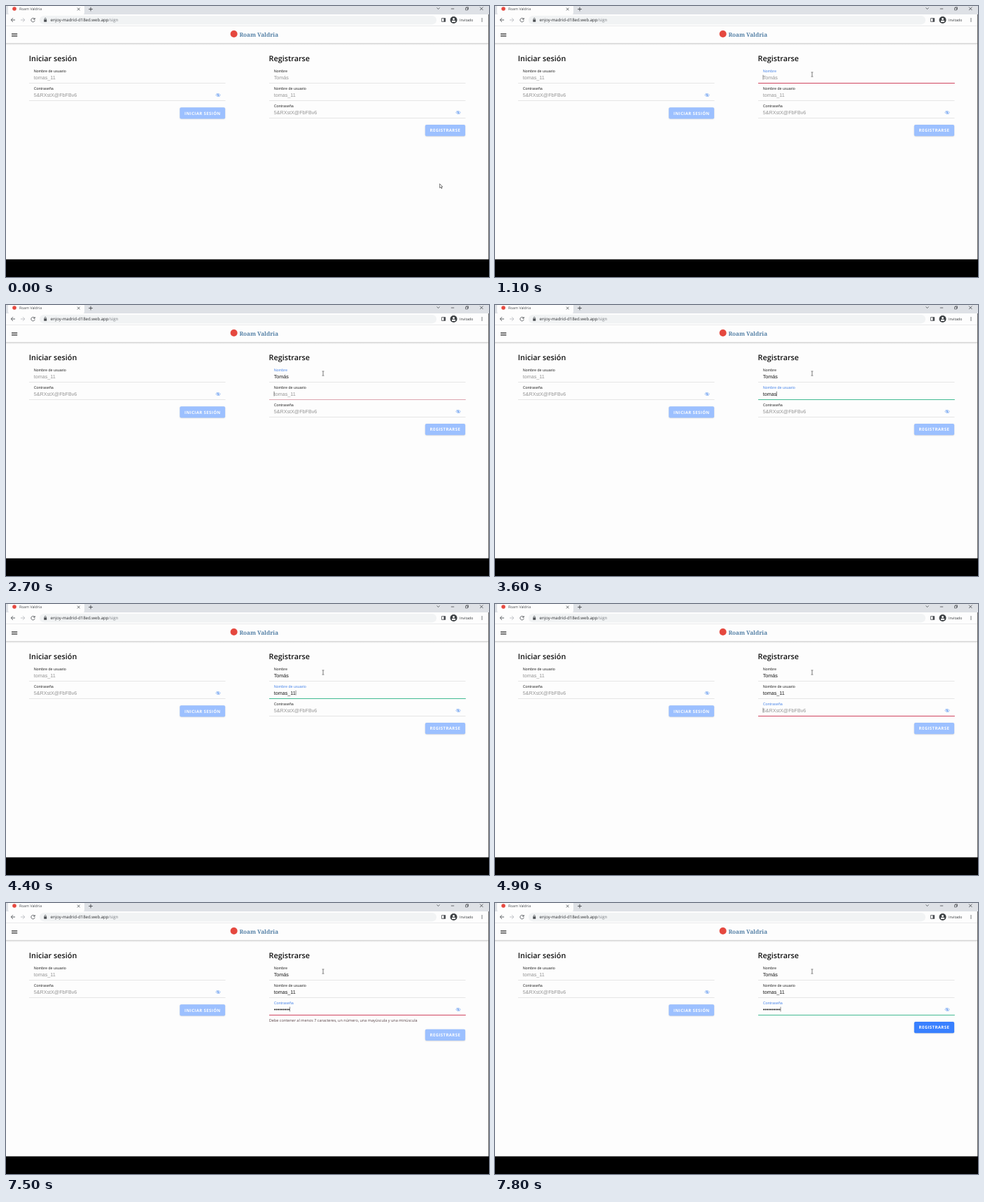
An HTML page with a canvas for the animation above (8000 ms loop, 690x388 px).

```html
<!DOCTYPE html>
<html lang="es">
<head>
<meta charset="utf-8">
<title>Roam Valdria</title>
<style>
html, body { margin: 0; width: 100%; height: 100%; overflow: hidden; background: #fdfdfd; }
canvas { display: block; width: 690px; height: 388px; }
</style>
</head>
<body>
<canvas id="stage"></canvas>
<script>
const W = 690, H = 388, LOOP = 8000, STEP = 100;
const UI = '"Open Sans", "Noto Sans", sans-serif';
const ARIAL = '"Liberation Sans", Arial, sans-serif';
const SLAB = '"Noto Serif", serif';
const RED = '#d0455f', GREEN = '#43bb92', LINE = '#e6e6e6';
const BRAND = 'Roam Valdria', PIN = '#e5483f';

const canvas = document.getElementById('stage');
const ctx = canvas.getContext('2d');
const dpr = window.devicePixelRatio || 1;
canvas.width = W * dpr;
canvas.height = H * dpr;
ctx.scale(dpr, dpr);
ctx.textRendering = 'geometricPrecision';

const clamp = v => Math.max(0, Math.min(1, v));
const smooth = v => v * v * (3 - 2 * v);
const mix = (a, b, p) => a + (b - a) * p;

function text(str, x, y, font, color, spacing = 0) {
  ctx.font = font;
  ctx.letterSpacing = spacing + 'px';
  ctx.fillStyle = color;
  ctx.fillText(str, x, y);
  return ctx.measureText(str).width;
}

function rect(x, y, w, h, color) {
  ctx.fillStyle = color;
  ctx.fillRect(x, y, w, h);
}

function round(x, y, w, h, r, color) {
  ctx.beginPath();
  ctx.roundRect(x, y, w, h, r);
  ctx.fillStyle = color;
  ctx.fill();
}

function dot(x, y, r, color) {
  ctx.beginPath();
  ctx.arc(x, y, r, 0, 7);
  ctx.fillStyle = color;
  ctx.fill();
}

function stroke(d, color, width, x = 0, y = 0) {
  ctx.save();
  ctx.translate(x, y);
  ctx.strokeStyle = color;
  ctx.lineWidth = width;
  ctx.stroke(new Path2D(d));
  ctx.restore();
}

function drawBrowser() {
  const ink = '#45484c';
  rect(0, 0, W, 12, '#dee1e6');
  round(3, -4, 109, 17, 4, '#fdfdfd');
  dot(12, 4, 2.8, PIN);
  text(BRAND, 19, 6.2, '5.2px ' + UI, '#45484c');
  stroke('M-1.8-1.8L1.8 1.8M1.8-1.8L-1.8 1.8', ink, 0.8, 103.7, 4.5);
  stroke('M-2.8 0H2.8M0-2.8V2.8', ink, 0.9, 121, 4.5);
  stroke('M-2-1L0 1L2-1', ink, 0.8, 617.5, 3.5);
  stroke('M-2.2 0H2.2', ink, 0.8, 638, 4);
  stroke('M-2-1H1V2H-2ZM-1-1V-2H2V1H1', ink, 0.7, 658.5, 3.8);
  stroke('M-2.2-2.2L2.2 2.2M2.2-2.2L-2.2 2.2', ink, 0.8, 679.3, 3.8);

  rect(0, 12, W, 16.5, '#fdfdfd');
  stroke('M3 0H-2.6M0-2.8L-2.8 0L0 2.8', '#505357', 0.9, 10, 20);
  stroke('M-3 0H2.6M0-2.8L2.8 0L0 2.8', '#b9bcc0', 0.9, 24, 20);
  stroke('M2.3-1.4A2.7 2.7 0 1 0 2.7 .7M2.7-3V-.9H.6', '#505357', 0.9, 38.5, 20);
  round(48, 14, 567, 12.4, 6.2, '#f1f3f4');
  round(54.2, 19.2, 4, 3.6, 0.5, '#505357');
  stroke('M-1.1 0V-1A1.1 1.1 0 0 1 1.1-1V0', '#505357', 0.7, 56.2, 19.3);
  const font = '6.05px ' + UI;
  const w = text('enjoy-madrid-d18ed.web.app', 63.5, 22.3, font, '#2b2d30');
  text('/sign', 63.5 + w, 22.3, font, '#777b80');

  stroke('M-2.6-2.4H2.6V2.4H-2.6Z', ink, 0.8, 625, 20);
  rect(625.4, 17.6, 2.4, 4.8, ink);
  dot(639.5, 20, 5, '#3c4043');
  dot(639.5, 18.4, 1.5, '#fdfdfd');
  round(636.8, 20.8, 5.4, 2.2, 1.1, '#fdfdfd');
  text('Invitado', 648, 22, '5.1px ' + UI, '#2f3235');
  for (const dy of [-2, 0, 2]) dot(680, 20 + dy, 0.65, ink);
  rect(0, 28, W, 0.7, '#e2e3e5');
}

function drawAppBar() {
  const g = ctx.createLinearGradient(0, 53, 0, 56);
  g.addColorStop(0, 'rgba(0,0,0,.18)');
  g.addColorStop(1, 'rgba(0,0,0,0)');
  rect(0, 53, W, 3, g);
  for (const y of [39, 41, 43]) rect(8, y, 8.2, 1, '#444');
  dot(325.6, 40, 5, PIN);
  text(BRAND, 333.4, 43.7, 'bold 8.1px ' + SLAB, '#5480a6');
}

function drawEye(x, y) {
  stroke('M-3.3 0Q0-4 3.3 0Q0 4-3.3 0Z', '#86b0f3', 0.8, x, y);
  dot(x, y, 1.2, '#77a6f2');
  stroke('M-2.3-2.2L2.3 2.2', '#77a6f2', 0.7, x, y);
}

function drawButton(label, x, y, w, strength) {
  ctx.save();
  ctx.shadowColor = 'rgba(0,0,0,.15)';
  ctx.shadowBlur = 1.6 * dpr;
  ctx.shadowOffsetY = 0.6 * dpr;
  const c = [56, 128, 255].map(v => Math.round(mix(255, v, strength)));
  round(x, y, w, 16.3, 2, `rgb(${c})`);
  ctx.restore();
  text(label, x + 6.8, y + 10.4, 'bold 6px ' + UI, '#fdfdfd', 0.4);
}

// One labelled input row; y is the centre of its value text.
function drawField({ label, hint, x, y, value = '', secret, focus = 0, tint = 0, caret, line }) {
  const tx = x + 6.7;
  const rgb = [[40, 74], [40, 134], [40, 232]].map(([a, b]) => Math.round(mix(a, b, tint)));
  text(label, tx, y - 7, '5.42px ' + ARIAL, `rgb(${rgb})`);

  let end = tx;
  if (!value) {
    text(hint, tx, y + 2.7, '7.2px ' + ARIAL, '#949494');
  } else if (secret) {
    for (let i = 0; i < value.length; i++) dot(tx + 1.4 + 2.5 * i, y + 0.6, 1, '#1c1c1c');
    end += 2.5 * value.length;
  } else {
    end += text(value, tx, y + 2.7, '7.2px ' + ARIAL, '#161616');
  }
  if (caret) rect(end, y - 3.3, 0.6, 6.8, '#444');

  rect(x, y + 8, 280.5, 1, LINE);
  if (focus) {
    ctx.globalAlpha = focus;
    rect(x, y + 8, 280.8, 1, line);
    ctx.globalAlpha = 1;
  }
  if (secret) drawEye(x + 270, y + 0.5);
}

function drawPointer(t) {
  const p = smooth(clamp(t / 600));
  const x = mix(619.6, 453, p), y = mix(254.6, 98, p);
  if (x > 376 && x < 656 && y < 161) {
    stroke('M-1.4-3.1H-.4L0-2.8L.4-3.1H1.4M0-2.8V2.8M-1.4 3.1H-.4L0 2.8L.4 3.1H1.4', '#333', 0.65, x, y);
    return;
  }
  ctx.save();
  ctx.translate(x, y);
  const arrow = new Path2D('M0 0V5.8L1.4 4.6L2.4 6.8L3.3 6.4L2.4 4.3H4.1Z');
  ctx.fillStyle = '#fff';
  ctx.fill(arrow);
  ctx.strokeStyle = '#222';
  ctx.lineWidth = 0.6;
  ctx.stroke(arrow);
  ctx.restore();
}

const NAME = { label: 'Nombre', hint: 'Tomás' };
const USER = { label: 'Nombre de usuario', hint: 'tomas_11' };
const PASS = { label: 'Contraseña', hint: '5&RXstX@FbFBv6', secret: true };
const HEADING = '600 10.8px ' + UI;
const VALID = 7700;

// from/to: focus span; keys: when each character lands; ok: when the value becomes valid
const form = [
  { ...NAME, y: 102, from: 900, to: 2700, ok: 1400, keys: [1400, 1600, 1800, 2300, 2400] },
  { ...USER, y: 127, from: 2700, to: 4600, ok: 3200, keys: [3200, 3400, 3400, 3600, 3600, 4100, 4300, 4400] },
  { ...PASS, y: 152, from: 4600, to: LOOP, ok: VALID,
    keys: [5200, 5500, 5700, 5900, 6100, 6600, 6800, 7000, 7500, 7700] }
];

function drawSignIn() {
  text('Iniciar sesión', 32.8, 79.2, HEADING, '#111');
  drawField({ ...USER, x: 33, y: 102 });
  drawField({ ...PASS, x: 33, y: 127 });
  drawButton('INICIAR SESIÓN', 248.3, 145.2, 64.8, 0.5);
}

function drawSignUp(t) {
  text('Registrarse', 375.6, 79.2, HEADING, '#111');
  for (const f of form) {
    const active = t >= f.from && t < f.to;
    const ramp = s => clamp((t - s - 20) / 180);
    drawField({
      ...f,
      x: 376,
      value: f.hint.slice(0, f.keys.filter(k => k <= t).length),
      caret: active,
      focus: active ? clamp((t - f.from + 80) / 200) : 0,
      tint: ramp(f.from) - (f.to < LOOP ? ramp(f.to) : 0),
      line: t < f.ok ? RED : GREEN
    });
  }
  const weak = t >= 5200 && t < VALID;
  if (weak) {
    text('Debe contener al menos 7 caracteres, un número, una mayúscula y una minúscula',
      375.8, 170.4, '5.53px ' + UI, '#5a4448');
  }
  const strength = mix(0.5, 1, clamp((t - VALID + 50) / 100));
  drawButton('REGISTRARSE', 598.8, weak ? 180.8 : 170, 57.3, strength);
}

function draw(t) {
  rect(0, 0, W, H, '#fdfdfd');
  drawBrowser();
  drawAppBar();
  drawSignIn();
  drawSignUp(t);
  rect(689, 12, 1, 351, '#666');
  rect(0, 362.7, W, 25.3, '#000');
  drawPointer(t);
}

const start = performance.now();
function tick() {
  const t = (performance.now() - start) % LOOP;
  draw(Math.floor(t / STEP) * STEP);
  requestAnimationFrame(tick);
}
tick();
</script>
</body>
</html>
```
